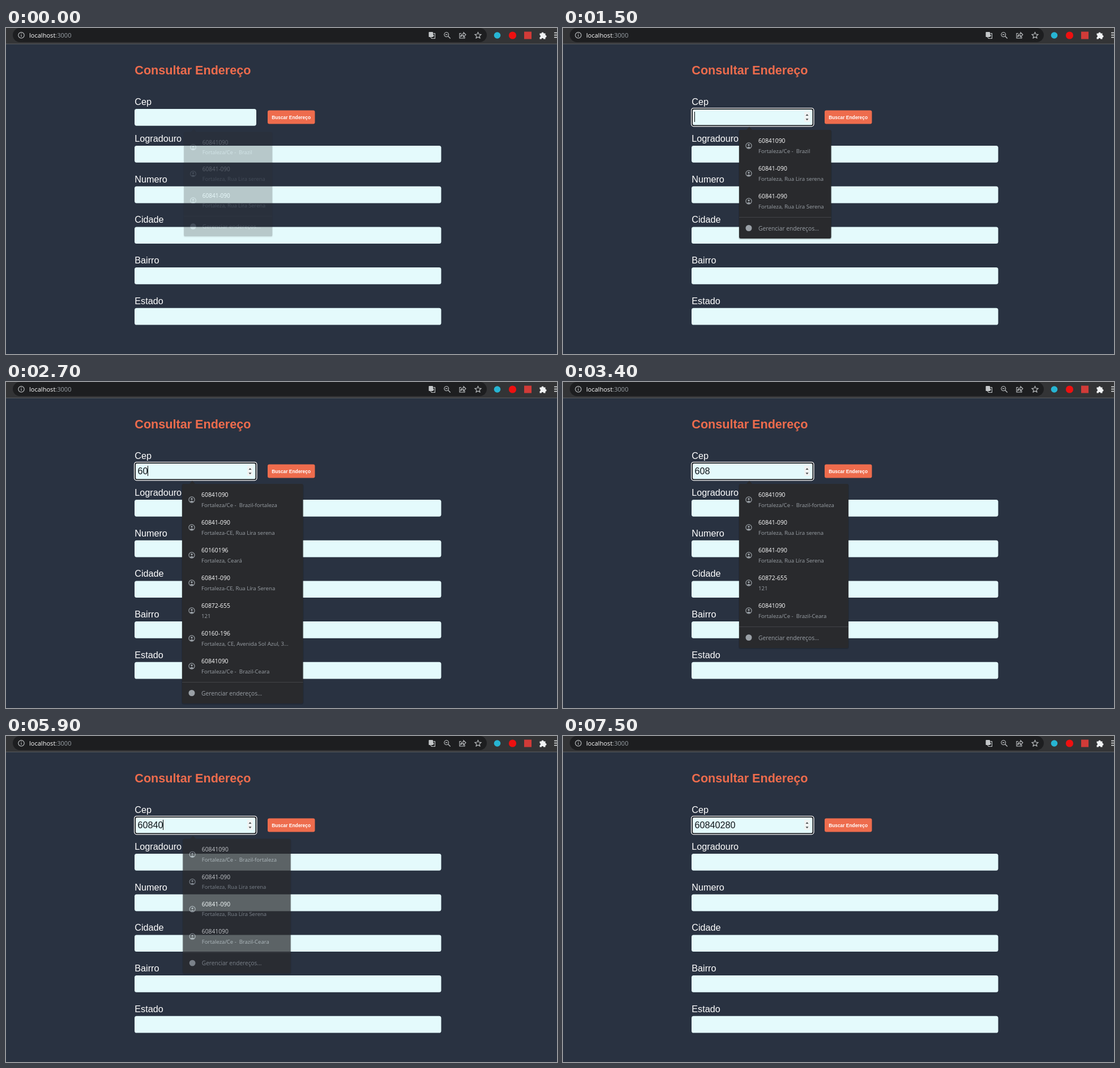
Write an HTML page that moves like this. It is 973x576 px and loops after 8 s.

```html
<!DOCTYPE html>
<html lang="pt-BR">
<head>
<meta charset="utf-8">
<title>Consultar Endereço</title>
<style>
  html, body { margin: 0; width: 100%; height: 100%; overflow: hidden; background: #293241; }
  svg { display: block; }
  text { white-space: pre; font-family: "Liberation Sans", Arial, sans-serif; }
  .ui text, text.ui { font-family: "Open Sans", "Noto Sans", sans-serif; }
  .label { font-size: 16.2px; fill: #fff; }
  .field { fill: #e4fafc; }
  .main { font-size: 10.4px; fill: #fff; }
  .sub { font-size: 9.65px; fill: #9aa0a6; }
  .manage { font-size: 10.25px; fill: #9aa0a6; }
  .line { fill: none; stroke: #c4c7c9; stroke-width: 1.1; }
  .panel { fill: #292a2d; }
  .shade { fill: #000; opacity: .16; }
</style>
</head>
<body>
<svg width="973" height="576" viewBox="0 0 973 576">
  <defs>
    <g id="person" fill="none" stroke="#9aa0a6" stroke-width="1.2">
      <circle r="5.1"/>
      <circle cy="-1.3" r="1.7" fill="#9aa0a6" stroke="none"/>
      <path d="M-3.4 3.4Q0 .3 3.4 3.4Q0 6 -3.4 3.4Z" fill="#9aa0a6" stroke="none"/>
    </g>
    <clipPath id="listClip"><rect x="311" y="180" width="240" height="382"/></clipPath>
  </defs>

  <!-- browser bar -->
  <rect width="973" height="28" fill="#333436"/>
  <rect y="27.6" width="973" height="1" fill="#5f6062"/>
  <rect x="12" y="0" width="837" height="25" rx="12.5" fill="#1d1e20"/>
  <g class="line">
    <circle cx="27" cy="12.8" r="5.2"/>
    <path d="M27 12v3.6M27 9.7v1.2"/>
    <path d="M751 9.5h6.500v9h-6l-2-3M753 13h3M754.500 11.500v4"/>
    <circle cx="777.8" cy="11.600" r="3.900"/>
    <path d="M780.700 14.500l4 4M776 11.600h3.600"/>
    <path d="M804 9.500h-3v8.500h9v-2.500M803 15q.5-4.500 5-4.500v-2.700l4 4-4 4v-2.700q-3 0-5 1.900z"/>
    <path d="M833.500 7.500l1.600 3.600 3.900.4-2.900 2.600.8 3.900-3.400-2-3.400 2 .8-3.900-2.900-2.600 3.900-.4z"/>
  </g>
  <rect x="746.500" y="7" width="7.500" height="9" rx="1" fill="#c4c7c9"/>
  <circle cx="867.5" cy="13" r="5.8" fill="#27b5d3"/>
  <circle cx="894.5" cy="13" r="6.600" fill="#ee1010"/>
  <rect x="915" y="6.500" width="13" height="13" fill="#d13b38"/>
  <path d="M942.500 9.500h3a2 2 0 1 1 4 0h3v3.200a2 2 0 1 1 0 4v2.800h-3.300a1.800 1.800 0 0 0-3.600 0h-3.100v-3.200a1.900 1.900 0 0 0 0-3.700z" fill="#f1f3f4"/>
  <path d="M968 8.500h5M968 12.500h5M968 16.500h5" stroke="#e4e6e8" stroke-width="1.4"/>
  <text class="ui" x="41" y="16.800" font-size="11.05" fill="#fff">localhost<tspan fill="#9aa0a6">:3000</tspan></text>

  <!-- form -->
  <text x="227.300" y="82" font-size="21.6" font-weight="bold" fill="#ee6c4d">Consultar Endereço</text>
  <g id="form"></g>
  <rect x="462" y="145.500" width="83.500" height="24" rx="3" fill="#ee6c4d"/>
  <text x="503.600" y="160.600" font-size="8.4" font-weight="bold" fill="#fff" text-anchor="middle">Buscar Endereço</text>

  <g id="focus" fill="none">
    <rect x="228" y="143" width="213.500" height="29.500" rx="3" stroke="#101216" stroke-width="2"/>
    <rect x="226.600" y="141.600" width="216.300" height="32.200" rx="4" stroke="#fff" stroke-width="1.3"/>
  </g>
  <g id="spinner">
    <rect x="426" y="148" width="10" height="18" fill="#f0f3f3"/>
    <path d="M428.500 155l2.500-3 2.500 3zM428.500 160.300l2.500 3 2.500-3z" fill="#484b4d"/>
  </g>
  <text id="typed" x="232.500" y="163" font-size="16.2" fill="#101418"></text>
  <rect id="caret" y="148" width="1" height="18" fill="#000"/>

  <g id="popups" class="ui"></g>
</svg>

<script>
const $ = id => document.getElementById(id);

// form rows
const rows = ['Cep', 'Logradouro', 'Numero', 'Cidade', 'Bairro', 'Estado'];
$('form').innerHTML = rows.map((name, i) => {
  const y = i ? 208 + (i - 1) * 71.7 : 143;
  return `<text class="label" x="227.300" y="${y - 7}">${name}</text>
    <rect class="field" x="227" y="${y}" width="${i ? 541.5 : 215}" height="29.700" rx="3.600"/>`;
}).join('');

// suggestions: [code, detail]
const brazil = ['60841090', 'Fortaleza/Ce -  Brazil'];
const city = ['60841090', 'Fortaleza/Ce -  Brazil-fortaleza'];
const ceara = ['60841090', 'Fortaleza/Ce -  Brazil-Ceara'];
const streetA = ['60841-090', 'Fortaleza, Rua Lira serena'];
const streetB = ['60841-090', 'Fortaleza, Rua Líra Serena'];
const longA = ['60841-090', 'Fortaleza-CE, Rua Lira serena'];
const longB = ['60841-090', 'Fortaleza-CE, Rua Líra Serena'];
const state = ['60160196', 'Fortaleza, Ceará'];
const number = ['60872-655', '121'];
const avenue = ['60160-196', 'Fortaleza, CE, Avenida Sol Azul, 3...'];
const coast = ['64206-173', 'Parnaíba'];

const popups = {
  start: { w: 162.5, items: [brazil, streetA, streetB] },
  side: { w: 234, items: [city, longA, state, longB, number, avenue, coast, ceara], side: true },
  two: { w: 213.5, items: [city, longA, state, longB, number, avenue, ceara] },
  three: { w: 193, items: [city, streetA, streetB, number, ceara] },
  four: { w: 193, items: [city, streetA, streetB, ceara] }
};

const item = ([code, detail], i) => `<g transform="translate(0 ${49 * i})">
  <use href="#person" x="328" y="208"/>
  <text class="main" x="345" y="203">${code}</text>
  <text class="sub" x="345" y="220.600">${detail}</text></g>`;

const scrollbar = `<rect x="530" y="183" width="14" height="376" fill="#1b1c1e"/>
  <rect x="531" y="198" width="12" height="329" fill="#4d4d4f"/>
  <path class="line" d="M534 193l3-3 3 3M534 549l3 3 3-3"/>`;

function popup(id, { w, items, side }) {
  const rule = side ? 562 : 187 + 49 * items.length;
  const h = rule + 38 - 180;
  const tip = side ? '311,189 305,195 311,201' : '323,181 329,174.5 335,181';
  return `<g id="${id}" data-cx="${311 + w / 2}" data-cy="${180 + h / 2}">
    <rect class="shade" x="310" y="180" width="${w + 2}" height="${h + 2}" rx="4"/>
    <polygon class="panel" points="${tip}"/>
    <rect class="panel" x="311" y="180" width="${w}" height="${h}" rx="3"/>
    <g ${side ? 'clip-path="url(#listClip)"' : ''}>${items.map(item).join('')}</g>
    ${side ? scrollbar : ''}
    <rect x="311" y="${rule}" width="${w}" height="1" fill="#424347"/>
    <circle cx="328" cy="${rule + 19.5}" r="5.500" fill="#9aa0a6"/>
    <text class="manage" x="345" y="${rule + 23.5}">Gerenciar endereços...</text></g>`;
}
$('popups').innerHTML = Object.entries(popups).map(([id, p]) => {
  const shift = p.side ? 'translate(138 -38)' : '';
  return `<g transform="${shift}">${popup(id, p)}</g>`;
}).join('');

// [start ms, typed length, caret shown, popup, popup opacity]
const steps = [
  [0, 0, 0, 'start', .235],
  [100, 0, 0],
  [1500, 0, 1, 'start', 1],
  [2000, 0, 0, 'start', 1],
  [2500, 1, 1, 'start', 1],
  [2600, 1, 1, 'side', 1],
  [2700, 2, 1, 'two', 1],
  [3000, 3, 1, 'three', 1],
  [3400, 3, 0, 'three', 1],
  [3900, 3, 1, 'three', 1],
  [4400, 3, 0, 'three', 1],
  [4900, 3, 1, 'three', 1],
  [5400, 3, 0, 'three', 1],
  [5700, 4, 1, 'four', 1],
  [5900, 5, 1, 'four', .72],
  [6000, 5, 1, 'four', .24],
  [6100, 5, 1],
  [6400, 5, 0],
  [6500, 6, 1],
  [6800, 7, 1],
  [7000, 8, 1],
  [7500, 8, 0]
];
const code = '60840280';
const show = (el, on) => el.setAttribute('visibility', on ? 'visible' : 'hidden');

function draw(t) {
  const [, length, caret, open, alpha] = steps.findLast(s => s[0] <= t);
  $('typed').textContent = code.slice(0, length);
  $('caret').setAttribute('x', 232 + 9 * length);
  show($('caret'), caret);
  show($('focus'), t >= 1500);
  $('spinner').setAttribute('opacity', Math.max(0, Math.min(1, (Math.floor(t / 100) - 2) / 4)));
  for (const id in popups) {
    const el = $(id);
    show(el, id === open);
    if (id !== open) continue;
    const { cx, cy } = el.dataset;
    el.setAttribute('opacity', alpha);
    el.setAttribute('transform', `translate(${cx} ${cy}) scale(${.95 + .05 * alpha}) translate(${-cx} ${-cy})`);
  }
}

const begin = performance.now();
function tick() {
  draw((performance.now() - begin) % 8000);
  requestAnimationFrame(tick);
}
tick();
</script>
</body>
</html>
```
